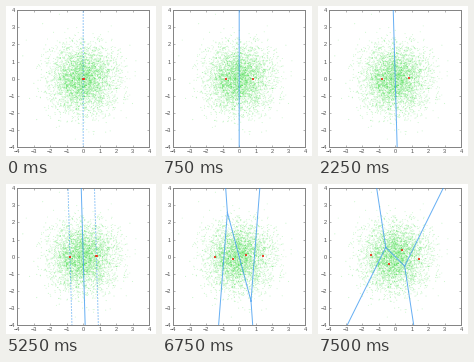
A matplotlib script that plays this animation: 150 px wide and 150 px high, repeating every 8 s.

```python
from itertools import combinations

import numpy as np
import matplotlib.pyplot as plt
from matplotlib.animation import FuncAnimation

SIZE, DPI = 150, 100
STEP, FRAMES = 250, 32
PT = 72 / DPI  # points per pixel
BLUE, GREEN, RED, INK = "#3595f0", "#10d818", "#e8341c", "#858585"

LAST = 7    # final stage
NEAR = .05  # offset of freshly split code vectors


def stage_at(ms):
    """Stages last 750 ms; the settled pair is held four times as long."""
    slot = ms // 750
    return slot if slot < 3 else max(3, slot - 3)


def code_vectors(stage):
    # the layout turns three times as far with each step
    tilt = np.tan(np.radians(46.4 / 3 ** max(0, min(3, LAST - stage))))
    if stage > 4:
        inner = (.4, .4 * tilt)
        outer = (1.46, tilt * (.165 - .27 * tilt))
        half = np.array([inner, outer])
    else:
        slope = np.tan(np.radians(1.7)) if stage > 2 else 0
        axis = np.array([1, slope])
        reach = [NEAR / 2] if stage == 0 else [.81]
        if stage == 4:
            reach = [.8 - NEAR / 2, .8 + NEAR / 2]
        half = np.outer(reach, axis)
    return np.vstack([half, -half])


def borders(codes):
    """Yield (gap, line) for each Voronoi edge between two code vectors."""
    t = np.linspace(-6, 6, 1500)[:, None]
    for a, b in combinations(codes, 2):
        d = b - a
        gap = np.hypot(*d)
        line = (a + b) / 2 + t * np.array([-d[1], d[0]]) / gap
        dist = np.linalg.norm(line[:, None] - codes, axis=2)
        own = np.linalg.norm(line - a, axis=1)
        line[dist.min(axis=1) < own - 1e-9] = np.nan
        yield gap, line


def chain(lines):
    gap = np.full((1, 2), np.nan)
    return np.vstack([gap] + [part for line in lines for part in (line, gap)]).T


fig = plt.figure(figsize=(SIZE / DPI, SIZE / DPI), dpi=DPI, facecolor="white")
ax = fig.add_axes([11.2 / SIZE, 8.8 / SIZE, 132 / SIZE, 137 / SIZE])
ax.set(xlim=(-4, 4), ylim=(-4, 4), xticks=range(-4, 5), yticks=range(-4, 5))
ax.tick_params(direction="in", top=True, right=True, length=2 * PT,
               width=.6 * PT, pad=2 * PT, color=INK)
for side in ax.spines.values():
    side.set(linewidth=PT, color=INK)
for label in ax.get_xticklabels() + ax.get_yticklabels():
    label.set(fontsize=5.6 * PT, color="#505050", family="Liberation Sans")

rng = np.random.default_rng(7)
x, y = rng.normal(size=(2, 4000))
ax.scatter(x, y, s=rng.uniform(.4, .7, x.size), c=GREEN, lw=0, alpha=.22,
           zorder=2)
solid, = ax.plot([], [], color=BLUE, lw=PT, alpha=.75, snap=False, zorder=3)
fine, = ax.plot([], [], color=BLUE, lw=PT, alpha=.5, snap=False, zorder=3,
                dashes=(2, 1))
dots, = ax.plot([], [], "s", ms=2.2 * PT, mew=0, color=RED, alpha=.9, zorder=4)


def draw(i):
    codes = code_vectors(stage_at(i * STEP))
    edges = list(borders(codes))
    solid.set_data(*chain(e for gap, e in edges if gap > 2 * NEAR))
    fine.set_data(*chain(e for gap, e in edges if gap <= 2 * NEAR))
    dots.set_data(*codes.T)
    return solid, fine, dots


anim = FuncAnimation(fig, draw, frames=FRAMES, interval=STEP,
                     repeat=True, repeat_delay=0)
plt.show()
```
